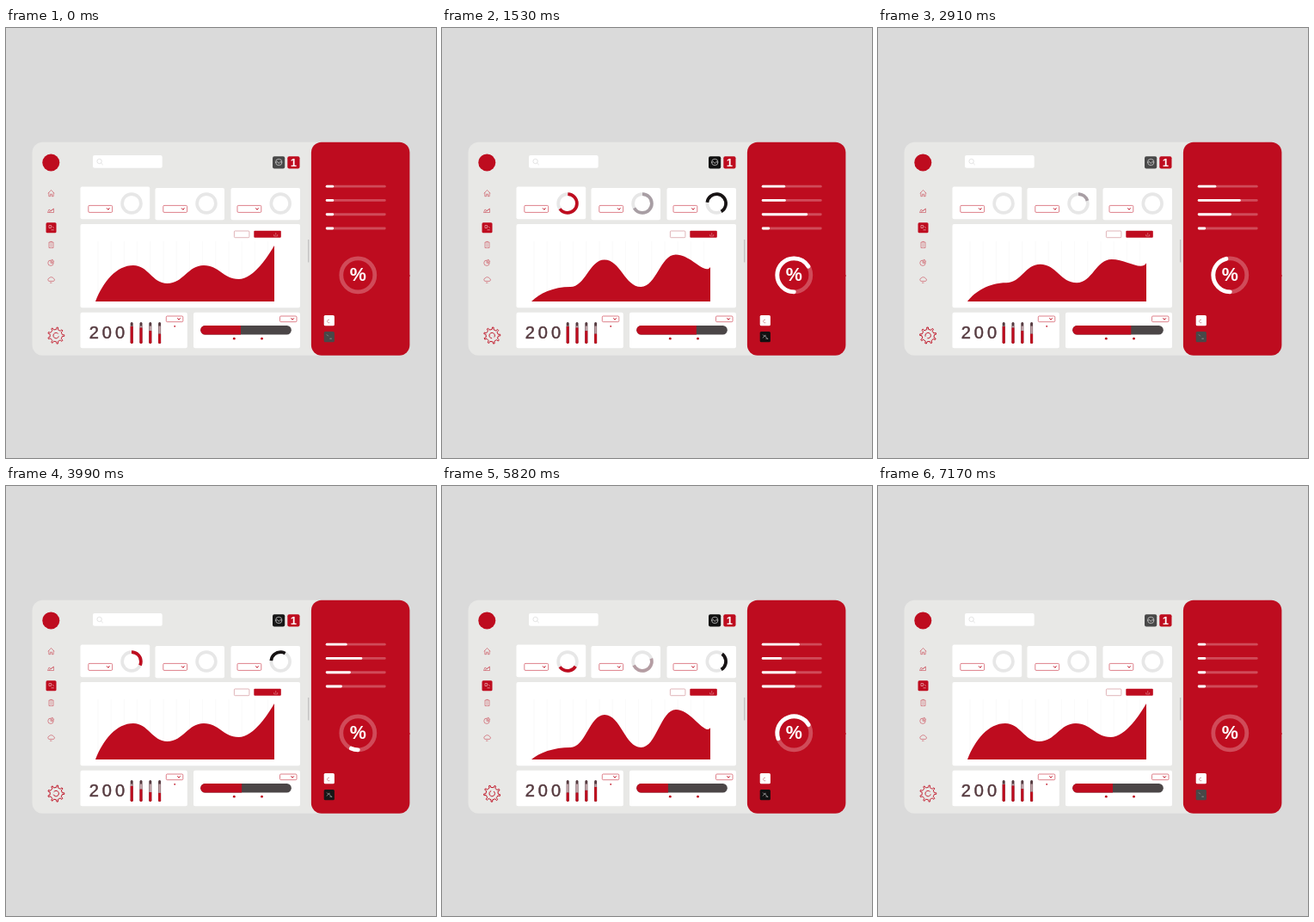
An HTML page that plays this animation: 500 px wide and 500 px high, repeating every 7.23 s.

```html
<!DOCTYPE html>
<html>
<head>
<meta charset="utf-8">
<style>
html, body { margin: 0; width: 100%; height: 100%; overflow: hidden; background: #dadada; }
svg { display: block; width: 100vw; height: 100vh; }
text { font-family: "Liberation Sans", Arial, sans-serif; }
</style>
</head>
<body>
<svg id="stage" viewBox="0 0 500 500"></svg>
<script>
const RED = '#be0c1f', ROSE = '#d04b59', LOOP = 7230, END = 7170, STEP = 30;
const stage = document.getElementById('stage');

const rect = (x, y, w, h, r, fill, more = '') =>
  `<rect x="${x}" y="${y}" width="${w}" height="${h}" rx="${r}" fill="${fill}" ${more}/>`;
const circle = (x, y, r, fill, more = '') =>
  `<circle cx="${x}" cy="${y}" r="${r}" fill="${fill}" ${more}/>`;
const line = (d, color, w, more = '') =>
  `<path d="${d}" fill="none" stroke="${color}" stroke-width="${w}" ${more}/>`;
const round = 'stroke-linecap="round"';
const label = (x, y, size, text) =>
  `<text x="${x}" y="${y}" font-size="${size}" font-weight="700" fill="#fff" text-anchor="middle">${text}</text>`;
const dropdown = (x, y, w, h) =>
  rect(x, y, w, h, 1.2, '#fff', `stroke="${ROSE}" stroke-width=".7"`) +
  line(`M${x + w - 6.5} ${y + h / 2 - 1}l1.7 1.9 1.7-1.9`, RED, 1);

// Degrees run clockwise from twelve o'clock.
const arc = (dial, color, from, to) => to - from < 1 ? '' :
  circle(dial.x, dial.y, dial.r, 'none', `stroke="${color}" stroke-width="${dial.w}"
    stroke-linecap="${dial.cap}" pathLength="360" stroke-dasharray="${to - from} 360"
    transform="rotate(${from - 90} ${dial.x} ${dial.y})"`);
const small = x => ({ x, y: 204, r: 10.9, w: 3.7, cap: 'butt' });
const dials = [small(146), small(233), small(319.2)];
const bigDial = { x: 409.3, y: 287.3, r: 19.5, w: 4.8, cap: 'round' };

const mix = (a, b, k) => a + (b - a) * k;
const grey = (a, b, k) => `rgb(${Array(3).fill(Math.round(mix(a, b, k)))})`;
function ease(t, from, to) {
  const k = Math.min(1, Math.max(0, (t - from) / (to - from)));
  return (1 - Math.cos(Math.PI * k)) / 2;
}
// Rises from a to b, holds until c and falls back by d.
const pulse = (t, a, b, c, d) => ease(t, a, b) - ease(t, c, d);

function gearPath(teeth) {
  const points = [];
  for (let i = 0; i < teeth * 4; i++) {
    const wide = i % 4 === 0 || i % 4 === 3;
    const angle = (Math.floor(i / 4) + [-.19, -.12, .12, .19][i % 4]) * 2 * Math.PI / teeth;
    const r = wide ? 7.2 : 9.6;
    points.push(`${(r * Math.cos(angle)).toFixed(2)} ${(r * Math.sin(angle)).toFixed(2)}`);
  }
  return `M${points.join('L')}Z`;
}
const gear = line(gearPath(9), RED, .85, 'stroke-linejoin="round"') +
  line('M2.4-2.1A3.2 3.2 0 1 0 3.1.8', RED, .85);

// Height of each crest and trough, calm and swollen.
const crests = [[104, 318, 318], [148, 276, 304], [187.5, 297, 266],
  [230, 276, 304], [270.5, 292, 260], [312, 253, 281]];
function areaPath(k) {
  const last = crests.length - 1;
  let d = '', px, py;
  crests.forEach(([x0, calm, swollen], i) => {
    const x = x0 + (i % last ? 1.5 * k : 0), y = mix(calm, swollen, k);
    if (!i) d = `M${x} ${y}`;
    else {
      const reach = (x - px) * .44;
      const out = i === 1 ? `${px + 9} ${mix(py, y, .55)}` : `${px + reach} ${py}`;
      const into = i === last ? `${x - 6} ${y + 10}` : `${x - reach} ${y}`;
      d += `C${out} ${into} ${x} ${y}`;
    }
    [px, py] = [x, y];
  });
  return d + 'V318H104Z';
}

const sideIcons = [
  'M48.8 192.3l3.7-3.8 3.7 3.8M49.8 191.5v4.2h1.8v-2.5h1.8v2.5h1.8v-4.2',
  'M48.5 214.5h7v-4.5l-3.2 2.6-2.3-1.6-1.5 3.5M50 214l5-3.5',
  'M50 249h5v6.6H50ZM51.5 248.4h2M51.3 251.2h2.4M51.3 253.4h2.4',
  'M52 270a3.2 3.2 0 1 0 3.2 3.3H52ZM53.2 269.2v3h2.4a3 3 0 0 0-2.4-3',
  'M50 294.4a1.8 1.8 0 0 1 0-3.4 3.2 3.2 0 0 1 5.3.2 1.7 1.7 0 0 1 0 3.2ZM51 296.2h2.5'
].map(d => line(d, RED, .55, 'opacity=".8"')).join('');

function backdrop() {
  let out = rect(30.5, 132.8, 430, 247.9, 12, '#e8e8e6') +
    rect(354.9, 132.8, 114.5, 247.9, 12, RED) +
    circle(52.3, 156.5, 10, RED) + sideIcons +
    rect(46.5, 226.3, 12, 12, 1.5, RED) +
    line('M50 229.5h2.5v3H50ZM52.5 234.8h3.3M53.8 230.5l1.8 2.2', '#f3c8cc', .6) +
    rect(101, 148, 80.7, 14.7, 2, '#fff') +
    line('M111.3 155a2.7 2.7 0 1 1-5.4 0a2.7 2.7 0 1 1 5.4 0M110.6 157l2.2 2.2', '#dcdcdc', .8) +
    rect(327.3, 149.2, 14.2, 14.2, 2, RED) + label(334.3, 160.8, 13, 1) +
    line('M351.7 246v26.5', '#c2c2c2', 1.3) + circle(469.2, 288, .7, RED) +
    rect(86.5, 184.5, 80.7, 37.7, 2, '#fff') +
    rect(173.5, 186, 80.5, 37.3, 2, '#fff') + rect(261.5, 186, 80.5, 37.3, 2, '#fff') +
    rect(86.5, 228, 255.5, 97.3, 2, '#fff') +
    rect(86.5, 330.8, 124.3, 41.4, 2, '#fff') + rect(218, 330.8, 124, 41.4, 2, '#fff');
  for (let x = 107; x < 315; x += 15.2) out += line(`M${x} 248V318`, '#f8f8f8', .8);
  for (const dial of dials) out += dropdown(dial.x - 50.2, 206.4, 27.8, 8) + arc(dial, '#e7e7e7', 0, 360);
  for (const x of [186.3, 318.5]) out += dropdown(x, 335, 19.5, 6.7);
  for (let i = 0; i < 4; i++) out += line(`M373 ${barY(i)}H440.3`, ROSE, 2.8, round);
  return out + arc(bigDial, ROSE, 0, 360) + label(409.3, 294.4, 21.5, '%') +
    rect(265.4, 236, 17.5, 7.7, 1, '#fff', 'stroke="#d3959b" stroke-width=".7"') +
    rect(288.3, 235.7, 31.5, 8, 1, RED) +
    line('M311.7 240v2h4v-2M313.7 238v2.8', '#e58d96', .6) +
    '<text x="96.7" y="360.5" font-size="20" letter-spacing="4" fill="#563b40" stroke="#563b40" stroke-width=".5">200</text>' +
    circle(196.2, 346.8, .9, RED) + circle(265.3, 361.2, 1.4, RED) + circle(297.5, 361.2, 1.4, RED) +
    rect(369.7, 334, 12.2, 12.2, 1.5, '#fff') +
    line('M376 339.3a1.8 1.8 0 1 0 .4 3.2', '#c67078', .7) +
    rect(226.3, 346, 105.5, 10.5, 5.2, '#4b4647');
}

// A dial fills over the grow span, then empties from its start over the shrink span.
const sweep = (t, dial, color, origin, span, grow, shrink) =>
  arc(dial, color, origin + span * ease(t, ...grow), origin + span * ease(t, ...grow) * 0 + origin * 0 + span * 0) && '';

function fill(t, dial, color, origin, span, grow, shrink) {
  return arc(dial, color, origin + span * ease(t, ...shrink), origin + span * ease(t, ...grow));
}
// A dial fills and then runs backwards.
const bounce = (t, dial, color, origin, span, ...times) =>
  arc(dial, color, origin, origin + span * pulse(t, ...times));

function drawDials(t) {
  const [red, mid, black] = dials;
  let out = '';
  for (const [grow, shrink] of [[[0, 1500], [1450, 2900]], [[3350, 4650], [4950, 6650]]]) {
    out += fill(t, red, RED, 0, 235, grow, shrink) +
      fill(t, black, '#171314', 275, 235, grow, shrink);
  }
  return out + bounce(t, mid, '#a89ea4', 0, 240, 0, 1450, 2000, 3450) +
    fill(t, mid, '#b59da3', 0, 245, [4050, 5400], [5200, 6900]) +
    bounce(t, bigDial, '#fff', 180, 240, 0, 1600, 2500, 3600) +
    fill(t, bigDial, '#fff', 180, 240, [3600, 5500], [5200, 6900]);
}

const barY = i => 184.2 + i * 16.27;
// First peak time, first gain and second gain of each bar.
const bars = [[1530, 18, 40], [3300, 42, 16], [1530, 44, 35], [1530, 0, 34]];

function scene(t) {
  const wave = pulse(t, 0, 1950, 2325, 3975) + pulse(t, 3975, 5625, 5830, END);
  const glow = pulse(t, 0, 1530, 1700, 2910) + pulse(t, 2910, 4300, 5900, END);
  const late = pulse(t, 3400, 5040, 5400, END);
  const split = 273 + 29 * pulse(t, 0, 2200, 2200, 4250) - 13 * pulse(t, 3990, 5200, 5200, END);
  const dark = grey(72, 17, glow);
  let out = `<path d="${areaPath(wave)}" fill="${RED}"/>` + drawDials(t);

  bars.forEach(([peak, first, second], i) => {
    const x = 379.8 + first * pulse(t, 0, peak, peak, 5100) + second * late;
    out += line(`M373.2 ${barY(i)}H${x}`, '#fff', 2.8, round);
  });
  out += `<path d="M${split} 346H231.5a5.25 5.25 0 0 0 0 10.5H${split}Z" fill="${RED}"/>`;

  for (let i = 0; i < 4; i++) {
    const x = 146.2 + i * 10.8, y = 352 - 5 * Math.cos(Math.PI * late + .8 * i);
    out += line(`M${x} 343.5V365.5`, '#563b40', 3, round) +
      line(`M${x} 346.5V${y}`, '#c3a5aa', 2.2) +
      line(`M${x} ${y}V365.5`, RED, 3) + circle(x, 365.5, 1.5, RED);
  }

  return out + rect(310, 149.2, 14.2, 14.2, 2, dark) +
    circle(317.2, 156, 3.7, 'none', 'stroke="#ddd" stroke-width=".7"') +
    line('M313.5 156.5l2-1 1.8 2 1.6-2 2 .8', '#ddd', .7) +
    rect(369.7, 353, 12.2, 12.2, 1.5, dark) +
    line('M373 356.5l1.8 1.8M376.4 361.2h2.4', '#aaa', .7) +
    line('M373 360.5l2.2-2.8 2.4 2.7 1.6 1.6M376 356.8v1.5', '#ddd', .6, `opacity="${glow}"`) +
    `<g transform="translate(58.2 357.6) rotate(${t / END * 360})">${gear}</g>`;
}

stage.innerHTML = backdrop() + '<g></g>';
const live = stage.lastElementChild;
const start = performance.now();
function draw() {
  const t = (performance.now() - start) % LOOP;
  live.innerHTML = scene(Math.min(END, t - t % STEP));
  requestAnimationFrame(draw);
}
draw();
</script>
</body>
</html>
```
